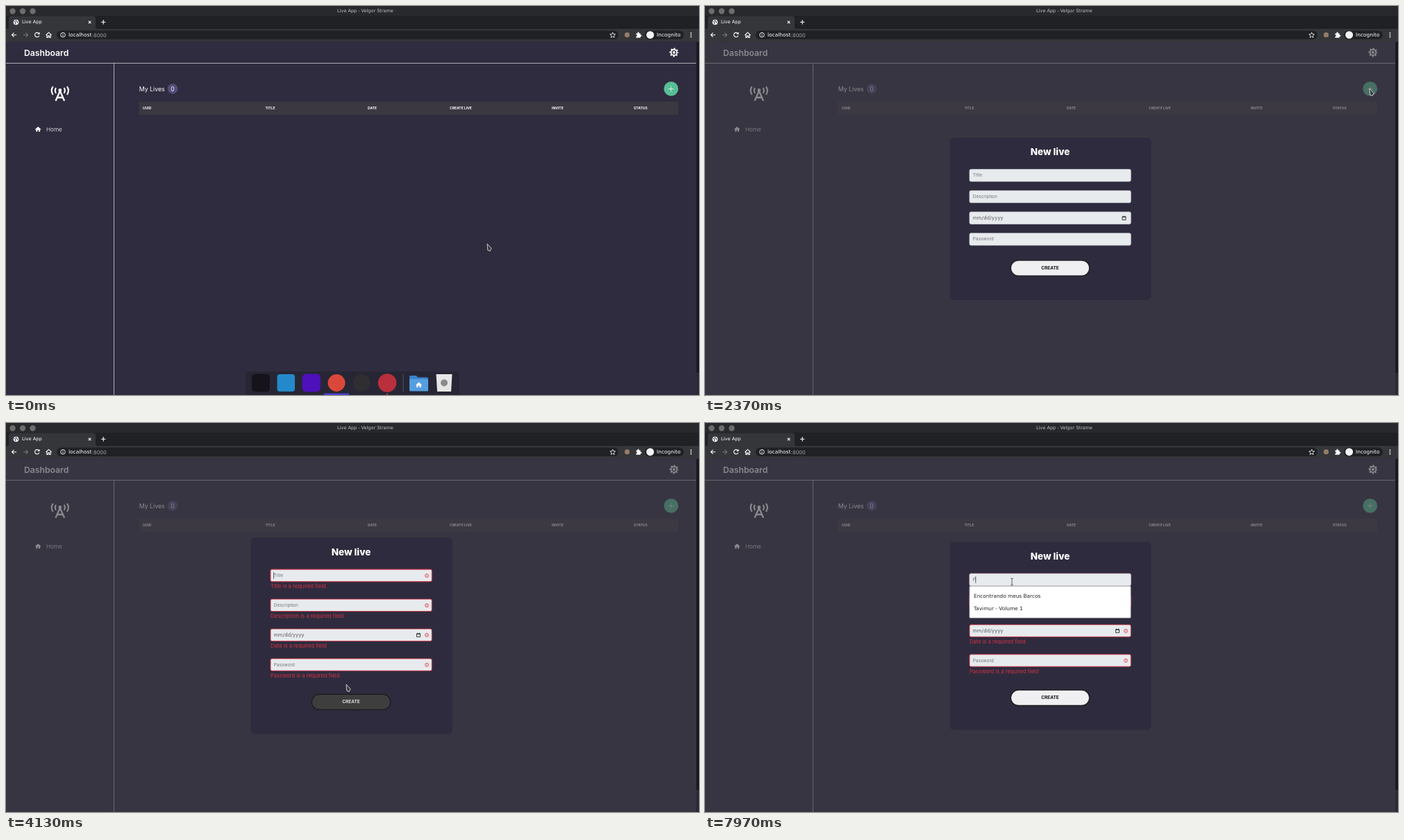
Recreate the animation shown at these times as an HTML page. Size 998 by 561 pixels, loop 8000 ms.

```html
<!DOCTYPE html>
<html lang="en">
<head>
<meta charset="utf-8">
<title>Live App</title>
<style>
  html, body { margin: 0; width: 100%; height: 100%; overflow: hidden; background: #302c3f; }
  svg { display: block; width: 100vw; height: 100vh; }
  text { font-family: Inter, Roboto, sans-serif; fill: #fff; dominant-baseline: central; white-space: pre; }
  .ui text { font-family: "DejaVu Sans", sans-serif; }
  .line { fill: none; stroke: #fff; }
  .head text { font-size: 5px; font-weight: 700; }
  .field text { font-size: 6.5px; fill: #74747c; }
  .field .error { font-size: 7.6px; fill: #cf3443; }
  .red { fill: none; stroke: #dc3545; }
</style>
</head>
<body>
<svg viewBox="0 0 998 561">
  <!-- browser window -->
  <g class="ui">
    <rect width="998" height="15" fill="#28292c"/>
    <rect y="14" width="998" height="20" fill="#202124"/>
    <g fill="#6d6d6e"><circle cx="9.5" cy="7.5" r="4.2"/><circle cx="24" cy="7.5" r="4.2"/><circle cx="38.5" cy="7.5" r="4.2"/></g>
    <text x="517.5" y="7" font-size="6.5" text-anchor="middle" style="fill:#c4c4c5">Live App - Velgor Strame</text>
    <path d="M2 33Q4 33 4 30V18Q4 14.5 8 14.5H125Q129 14.5 129 18V30Q129 33 131 33H998V51H0V33Z" fill="#35363a"/>
    <circle cx="14.5" cy="23.3" r="3.9" fill="#e8eaed"/>
    <path d="M11.5 22l2.3 1.3-.4 2.8M14.5 19.8l-.6 1.6 2.3.9.5 2.2" fill="none" stroke="#35363a" stroke-width=".9"/>
    <text x="23" y="23.2" font-size="6.7">Live App</text>
    <path class="line" d="M118.8 21.6l3.6 3.6m0-3.6l-3.6 3.6M137 23.3h6.4M140.2 20.1v6.4" stroke-width="1.1"/>
    <path class="line" d="M15 41.7H8.5m3-3l-3 3 3 3M47.3 39.6A3.2 3.2 0 1 0 47.8 42.6M48 38v2.3h-2.4M57.5 42l4-3.8 4 3.8M58.8 41.5v4h1.7v-2.4h2v2.4h1.7v-4" stroke-width="1.1"/>
    <path d="M25 41.7h6.5m-3-3l3 3-3 3" fill="none" stroke="#77787b" stroke-width="1.1"/>
    <rect x="73" y="35.5" width="809" height="12.6" rx="6.3" fill="#202124"/>
    <circle class="line" cx="82" cy="41.7" r="3.3" stroke-width=".9"/>
    <path class="line" d="M82 41.2v2.3M82 39.6v.8" stroke-width=".9"/>
    <text x="90" y="41.5" font-size="7.45">localhost<tspan fill="#9aa0a6">:8000</tspan></text>
    <path class="line" d="M873.7 38l1.1 2.6 2.8.2-2.1 1.9.6 2.8-2.4-1.5-2.4 1.5.6-2.8-2.1-1.9 2.8-.2Z" stroke-width=".8"/>
    <circle cx="894.5" cy="41.7" r="3.6" fill="#967c68"/>
    <path d="M907.5 39.5h2q-.4-2 1.1-2t1.1 2h2v2.2q1.8-.3 1.8 1.1t-1.8 1.1v1.9h-6.2v-2q1.6-.2 1.6-1.2t-1.6-1.1Z" fill="#fff"/>
    <rect x="920" y="35.5" width="56" height="12.6" rx="6.3" fill="#202124"/>
    <circle cx="927.7" cy="41.7" r="5.5" fill="#f1f3f4"/>
    <text x="937" y="41.5" font-size="7.45">Incognito</text>
    <g fill="#fff"><circle cx="986.5" cy="38.9" r=".9"/><circle cx="986.5" cy="41.7" r=".9"/><circle cx="986.5" cy="44.5" r=".9"/></g>
  </g>

  <!-- page -->
  <rect y="51" width="998" height="510" fill="#302c3f"/>
  <text x="26" y="67" font-size="12.2" font-weight="600">Dashboard</text>
  <g class="line">
    <circle cx="962" cy="67" r="5.5" stroke-width="1.9" stroke-dasharray="2.16" stroke-dashoffset="1.08"/>
    <circle cx="962" cy="67" r="4.1" stroke-width="1.7"/>
    <circle cx="962" cy="67" r="1.9" fill="#fff" stroke="none"/>
    <path d="M0 82.5H994M155.5 83V561" stroke="#adabb4"/>
    <path d="M71.5 136.8L77.8 122.5 84.1 136.8M74 132H81.6" stroke-width="2.3"/>
    <path d="M67.7 116.2Q63.7 121.8 67.7 128M87.9 116.2Q91.9 121.8 87.9 128M72 118Q69.5 121.8 72 125.8M83.6 118Q86.1 121.8 83.6 125.8" stroke-width="2.1"/>
  </g>
  <circle cx="77.8" cy="121.5" r="2.4" fill="#fff"/>
  <path d="M42 177.7L46.2 174 50.4 177.7 49.6 178.4 49.1 178V181.2H47V178.8H45.4V181.2H43.3V178L42.7 178.4Z" fill="#fff"/>
  <text x="58" y="177.7" font-size="8.2" font-weight="300">Home</text>
  <text x="191.7" y="119.3" font-size="8.8">My Lives</text>
  <circle cx="240" cy="119.4" r="7.3" fill="#504d79"/>
  <text x="240" y="119.5" font-size="8.5" text-anchor="middle">0</text>
  <circle id="plus" cx="957.8" cy="119.4" r="10.4"/>
  <path class="line" d="M953.7 119.5h8m-4-4v8" stroke-width=".8" stroke-opacity=".85"/>
  <rect x="191.7" y="138" width="776.5" height="18.7" rx="1" fill="#3b3842"/>
  <g class="head">
    <text x="197" y="147.4">UUID</text><text x="373.5" y="147.4">TITLE</text>
    <text x="521" y="147.4">DATE</text><text x="639" y="147.4">CREATE LIVE</text>
    <text x="786" y="147.4">INVITE</text><text x="904" y="147.4">STATUS</text>
  </g>
  <rect id="shade" y="51" width="994.5" height="510" fill="#3d3b44"/>
  <rect x="994.5" y="51" width="3.5" height="510" fill="#2b2935"/>
  <rect x="994.5" y="52" width="3.5" height="477" fill="#17171d"/>

  <g id="modal">
    <rect id="card" x="352.5" width="290" rx="5" fill="#2f2b3e"/>
    <text id="heading" x="497" font-size="13.5" font-weight="800" text-anchor="middle">New live</text>
    <g id="fields"></g>
    <g id="create">
      <rect id="pill" x="440.2" y="-11.2" width="113.6" height="22.4" rx="11.2" stroke="#1d1d20" stroke-width="1.5"/>
      <text id="label" x="497" font-size="6.5" font-weight="700" text-anchor="middle">CREATE</text>
    </g>
    <path id="caret" stroke="#333" stroke-width=".8"/>
    <g id="list" class="ui" font-size="7.35">
      <rect x="381" y="235.5" width="232" height="45.5" rx="1" fill="#fff" stroke="#c8c8cc" stroke-width=".7"/>
      <text x="387" y="249" style="fill:#222">Encontrando meus Barcos</text>
      <text x="387" y="267.7" style="fill:#222">Tavimur - Volume 1</text>
    </g>
  </g>

  <!-- dock -->
  <g id="dock">
    <path d="M345 561V532Q345 527 350 527H648Q653 527 653 532V561Z" fill="#272635"/>
    <rect x="354" y="530.5" width="26" height="26" rx="5" fill="#17131b"/>
    <rect x="390.5" y="531" width="25.5" height="25" rx="4" fill="#2489ca"/>
    <rect x="426.5" y="530.5" width="26.5" height="26" rx="6" fill="#4d10bb"/>
    <circle cx="476" cy="543.5" r="12.5" fill="#da483c"/>
    <circle cx="512.3" cy="543.5" r="12.3" fill="#302e31"/>
    <circle cx="549" cy="543.5" r="13.3" fill="#b92f3c"/>
    <path d="M572 531V556" stroke="#55535f"/>
    <path d="M581 535Q581 533 583 533H591L593 535.5H606Q608 535.5 608 537.5V555H581Z" fill="#3c84cc"/>
    <rect x="581" y="538" width="27" height="17.5" rx="1.5" fill="#559ee0"/>
    <path d="M590 546.5l4.5-4 4.5 4h-1.2v3.5h-2.3v-2.5h-2v2.5h-2.3v-3.5Z" fill="#fff"/>
    <path d="M619.5 531H642.5L641 556H621Z" fill="#e6e6e6"/>
    <circle cx="631" cy="543.5" r="5" fill="#8b8b8d"/>
    <rect x="458" y="558.5" width="36" height="2.5" fill="#4941c9"/>
    <circle cx="549" cy="559.8" r="1.2" fill="#c23440"/>
  </g>

  <path id="cursor" stroke-width=".85" stroke-linejoin="round"/>
</svg>
<script>
const LOOP = 8000, OPEN = 1870, SUBMIT = 4030, TYPED = 7870, LIST = 7960;
const $ = id => document.getElementById(id);
const show = (el, on) => el.setAttribute('visibility', on ? 'inherit' : 'hidden');
const span = (t, a, b) => Math.max(0, Math.min(1, (t - a) / (b - a)));
const linear = p => p;
const smooth = p => p * p * (3 - 2 * p);
const easeOut = p => p * (2 - p);
const mix = (a, b, p) => `rgb(${a.map((v, i) => Math.round(v + (b[i] - v) * p))})`;

const shapes = {
  arrow: 'M0 0L6 6.4 4.2 10.5.8 9.2Z',
  hand: 'M-.9.6Q0-.6.9.6V4.5L4.5 5.3Q5.5 5.6 5.3 7L4.6 11H-.2L-2.8 7.5Q-2.6 5.8-.9 6.8Z',
  beam: 'M-1.8-5Q0-5 0-4Q0-5 1.8-5M0-4V4M-1.8 5Q0 5 0 4Q0 5 1.8 5'
};

// [start, end, x, y, easing] moves of the pointer
const moves = [
  [70, 870, 911, 194, p => p ** 1.3],
  [870, 1230, 957, 119, easeOut],
  [2370, 3030, 538, 362, smooth],
  [3030, 3300, 490, 377, easeOut],
  [4630, 4770, 478, 357, p => p * p],
  [4770, 5270, 442, 226, easeOut],
  [5470, 5530, 442, 229, linear]
];

function pointer(t) {
  let x = 693, y = 343;
  for (const [a, b, toX, toY, ease] of moves) {
    const p = ease(span(t, a, b));
    x += (toX - x) * p;
    y += (toY - y) * p;
  }
  return [x, y];
}

const fields = ['Title', 'Description', 'Date', 'Password'].map((name, i) => {
  const g = document.createElementNS('http://www.w3.org/2000/svg', 'g');
  const date = name === 'Date';
  g.setAttribute('class', 'field');
  g.innerHTML = `
    <rect class="glow red" x="380.5" y="-9.2" width="233" height="18.4" rx="2.5" stroke-opacity=".35"/>
    <rect class="box" x="381" y="-8.7" width="232.2" height="17.4" rx="2" fill="#e8ebee" stroke-width=".8"/>
    <text class="hint" x="385.7" ${date ? 'style="font-size:7px;letter-spacing:.25px;fill:#55555c"' : ''}>${date ? 'mm/dd/yyyy' : name}</text>
    ${date ? '<path class="day" d="M-2.5-1.8h5v4.5h-5ZM-2.5-1.5h5M-1.5-3v1M1.5-3v1" fill="none" stroke="#222" stroke-width=".9"/>' : ''}
    <g class="bad">
      <circle class="red" cx="606" cy=".2" r="2.5" stroke-width=".8"/>
      <path class="red" d="M606-1.2V.6M606 1.1v.7" stroke-width=".8"/>
      <text class="error" x="381" y="15.8">${name} is a required field</text>
    </g>`;
  $('fields').append(g);
  const part = c => g.querySelector('.' + c);
  return { g, glow: part('glow'), box: part('box'), hint: part('hint'), day: part('day'), bad: part('bad') };
});

function drawModal(t) {
  const typed = t >= TYPED, failed = t >= SUBMIT;
  const count = failed ? (typed ? 3 : 4) : 0;
  const top = 190 - 6.1 * count;
  $('card').setAttribute('y', top);
  $('card').setAttribute('height', 234 + 12.2 * count);
  $('heading').setAttribute('y', top + 20);
  $('create').setAttribute('transform', `translate(0 ${top + 188 + 12.2 * count})`);

  let y = top + 54.3;
  const rows = fields.map((f, i) => {
    const bad = failed && !(typed && i === 0), row = y;
    f.g.setAttribute('transform', `translate(0 ${row})`);
    f.box.setAttribute('stroke', bad ? '#dc3545' : '#cfd3d8');
    show(f.bad, bad);
    show(f.glow, failed && i === 0);
    if (f.day) f.day.setAttribute('transform', `translate(${bad ? 594 : 603.5} 0)`);
    y += 30.7 + (bad ? 12.2 : 0);
    return row;
  });
  fields[0].hint.textContent = typed ? 'P' : 'Title';

  const hover = smooth(span(t, 3140, 3500)) * (1 - smooth(span(t, SUBMIT, 4450)));
  $('pill').setAttribute('fill', mix([240, 239, 241], [32, 32, 33], hover));
  $('label').style.fill = mix([18, 18, 20], [255, 255, 255], hover);

  $('caret').setAttribute('d', `M${typed ? 389.8 : 385.5} ${rows[0] - 4.8}v9.6`);
  show($('caret'), failed && (typed || (t - SUBMIT) % 1200 < 600));
  show($('list'), t >= LIST);
  return rows;
}

function draw(t) {
  const open = t >= OPEN;
  $('dock').setAttribute('transform', `translate(0 ${38 * smooth(span(t, 70, 500))})`);
  $('plus').setAttribute('fill', mix([88, 190, 150], [31, 158, 117], open ? 0 : span(t, 1100, 1430)));
  $('shade').setAttribute('opacity', open ? (t < 1930 ? .4 : .6) : 0);
  $('modal').setAttribute('opacity', open ? (t < 1930 ? .6 : 1) : 0);
  const rows = drawModal(t);

  const [x, y] = pointer(t);
  const onPlus = !open && Math.hypot(x - 957.8, y - 119.4) < 10.4;
  const onCreate = t >= 3140 && t < SUBMIT;
  const onField = open && x > 381 && x < 613 && rows.some(r => Math.abs(y - r) < 8.2);
  const shape = onPlus || onCreate ? 'hand' : onField ? 'beam' : 'arrow';
  const cursor = $('cursor');
  cursor.setAttribute('d', shapes[shape]);
  cursor.setAttribute('fill', shape === 'beam' ? 'none' : '#3b3a40');
  cursor.setAttribute('stroke', shape === 'beam' ? '#444' : '#e4e4e6');
  cursor.setAttribute('transform', `translate(${x} ${y})`);
}

const start = performance.now();
function tick() {
  draw((performance.now() - start) % LOOP);
  requestAnimationFrame(tick);
}
tick();
</script>
</body>
</html>
```
